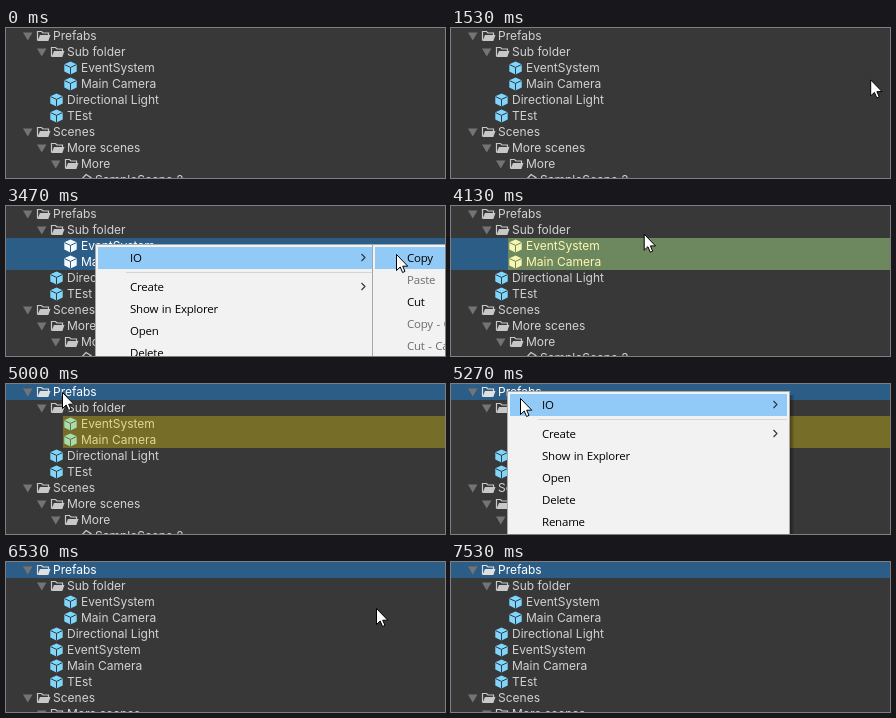
These frames come from a looping animation (439x150 px, 7.94 s). An HTML page:

```html
<!DOCTYPE html>
<html lang="en">
<head>
<meta charset="utf-8">
<style>
html, body { margin: 0; width: 100%; height: 100%; overflow: hidden; background: #383838; }
svg { display: block; width: 439px; height: 150px; }
.row { font: 12px Inter, sans-serif; }
.menu { font: 11.5px "Open Sans", sans-serif; letter-spacing: -.22px; word-spacing: .8px; }
</style>
</head>
<body>
<svg id="stage" viewBox="0 0 439 150" xmlns="http://www.w3.org/2000/svg"></svg>
<script>
const stage = document.getElementById('stage');
const LOOP = 7940, TICK = 1000 / 15, ROW = 16, ITEM = 22;
const MENU_W = 283, SUB_X = 277;

// [indent, icon, label]
const head = [[0, 'folder', 'Prefabs'], [1, 'folder', 'Sub folder'],
  [2, 'cube', 'EventSystem'], [2, 'cube', 'Main Camera'], [1, 'cube', 'Directional Light']];
const pasted = [[1, 'cube', 'EventSystem'], [1, 'cube', 'Main Camera']];
const tail = [[1, 'cube', 'TEst'], [0, 'folder', 'Scenes'], [1, 'folder', 'More scenes'],
  [2, 'folder', 'More'], [3, 'scene', 'SampleScene 2']];

const mainItems = ['IO', 'Create', 'Show in Explorer', 'Open', 'Delete', 'Rename'];
const subItems = ['Copy', 'Paste', 'Cut', 'Copy - Cancel', 'Cut - Cancel'];

// Menus: ticks when open, tick of the submenu, position, disabled entries
const menus = [
  { from: 41, to: 55, sub: 48, x: 89, y: 38, off: [1, 3, 4] },
  { from: 77, to: 95, sub: 84, x: 56, y: 7, off: [4] }
];

// Pointer path: [tick, x, y]
const path = [[22, 445, 52], [28, 97, 44], [30, 95, 44], [32, 93, 55], [34, 93, 55],
  [37, 89, 39], [42, 89, 39], [45, 120, 50], [52, 390, 48], [55, 390, 48],
  [66, 108, 19], [72, 56, 8], [76, 56, 8], [79, 69, 14], [86, 313, 20],
  [90, 377, 34], [91, 373, 49], [92, 370, 46], [104, 370, 46], [113, 90, 152]];

const rect = (x, y, w, h, fill, extra = '') =>
  `<rect x="${x}" y="${y}" width="${w}" height="${h}" fill="${fill}" ${extra}/>`;
const text = (x, y, s, fill, cls) =>
  `<text class="${cls}" x="${x}" y="${y}" fill="${fill}">${s}</text>`;

const icons = {
  folder: c => `<path d="M1.5 12.5V3.5H5.5L7 5H12.5V7" fill="none" stroke="${c}" stroke-width="1.2"/>
    <path d="M1.5 13L4 7H14.5L12.3 13Z" fill="${c}"/>`,
  cube: (c, bg) => `<path d="M6.5 1.4L12.7 4.2V11.4L6.5 14.6L.3 11.4V4.2Z" fill="${c}"/>
    <path d="M.5 4.6L6.5 7.4L12.5 4.6M6.5 7.4V14.4" fill="none" stroke="${bg}"/>`,
  scene: c => `<path d="M8 2.5L13 5.5V11L8 14L2.5 8.5Z M2.5 8.5H8L13 5.5M8 8.5V14" fill="none" stroke="${c}" stroke-width="1.3"/>`
};

function pointer(k) {
  const i = path.findIndex(p => p[0] > k);
  if (i < 1) return null;
  const [a, ax, ay] = path[i - 1], [b, bx, by] = path[i];
  const u = (k - a) / (b - a);
  const e = b - a > 5 ? u * u * (3 - 2 * u) : u;
  return [ax + (bx - ax) * e, ay + (by - ay) * e];
}

function drawRow([depth, icon, label], i, picked) {
  const x = 17 + depth * 14, y = i * ROW;
  const bg = picked ? '#2c5d87' : '#383838';
  const ink = picked ? '#fff' : '#d2d2d2';
  const plain = icon === 'cube' ? '#7fd6fd' : '#c8c8c8';
  const lit = icon === 'cube' ? '#f4fbff' : '#e0e0e0';
  return (picked ? rect(0, y, 439, ROW, bg) : '') +
    (icon === 'folder' ? `<path d="M${x} ${y + 4.5}h9.5l-4.75 8Z" fill="#747474"/>` : '') +
    `<g transform="translate(${x + 13} ${y})">${icons[icon](picked ? lit : plain, bg)}</g>` +
    text(x + 30, y + 12, label, ink, 'row');
}

function panel(x, y, h) {
  let s = '';
  for (let i = 1; i < 5; i++) s += rect(x + 4, y + 4, MENU_W - 4 + i, h - 4 + i, '#000', 'opacity=".1"');
  return s + rect(x + .5, y + .5, MENU_W - 1, h - 1, '#f2f2f2', 'stroke="#a8a8a8"');
}

function entry(x, y, label, lit, off) {
  return (lit ? rect(x + 3, y, MENU_W - 6, ITEM, '#91c9f7') : '') +
    text(x + 35, y + 15, label, off ? '#6d6d6d' : '#000', 'menu');
}

function drawMenu(m, k, [px, py]) {
  const { x, y } = m, open = k >= m.sub;
  let s = panel(x, y, 240);
  mainItems.forEach((label, i) => {
    const top = y + 3 + i * ITEM + (i ? 7 : 0);
    const lit = i === 0 && (open || py >= top);
    s += entry(x, top, label, lit);
    if (i < 2) s += `<path d="M${x + 266.5} ${top + 7}l3.5 3.5l-3.5 3.5" fill="none" stroke="#333" stroke-width="1.1"/>`;
  });
  s += rect(x + 31, y + 28, MENU_W - 34, 1, '#d5d5d5');
  if (!open) return s;
  const sx = x + SUB_X;
  s += panel(sx, y, subItems.length * ITEM + 6);
  subItems.forEach((label, i) => {
    const top = y + 3 + i * ITEM;
    const lit = px >= sx + 3 && py >= top && py < top + ITEM;
    s += entry(sx, top, label, lit, m.off.includes(i));
  });
  return s;
}

function draw(k) {
  const done = k >= 98;
  const rows = done ? [...head, ...pasted, ...tail] : [...head, ...tail];
  const picked = k < 29 ? [] : k < 34 ? [2] : k < 75 ? [2, 3] : [0];
  const at = pointer(k);
  let s = rect(0, 0, 439, 150, '#383838');
  rows.slice(0, 10).forEach((r, i) => s += drawRow(r, i, picked.includes(i)));
  if (k >= 55 && !done) s += rect(57, 32, 382, 32, '#ffe604', 'opacity=".31"');
  const m = menus.find(m => k >= m.from && k < m.to);
  if (m) s += drawMenu(m, k, at);
  if (at) s += `<path transform="translate(${at[0].toFixed(1)} ${at[1].toFixed(1)})"
    d="M.5 .5V16.5L4.2 13L6.6 18.5L9 17.4L6.7 12.2H11.8Z" fill="#fff" stroke="#000"/>`;
  stage.innerHTML = s;
}

const start = performance.now();
let last = -1;
function tick() {
  const t = (performance.now() - start) % LOOP;
  const k = Math.floor((t + 5) / TICK);
  if (k !== last) draw(last = k);
  requestAnimationFrame(tick);
}
tick();
</script>
</body>
</html>
```
